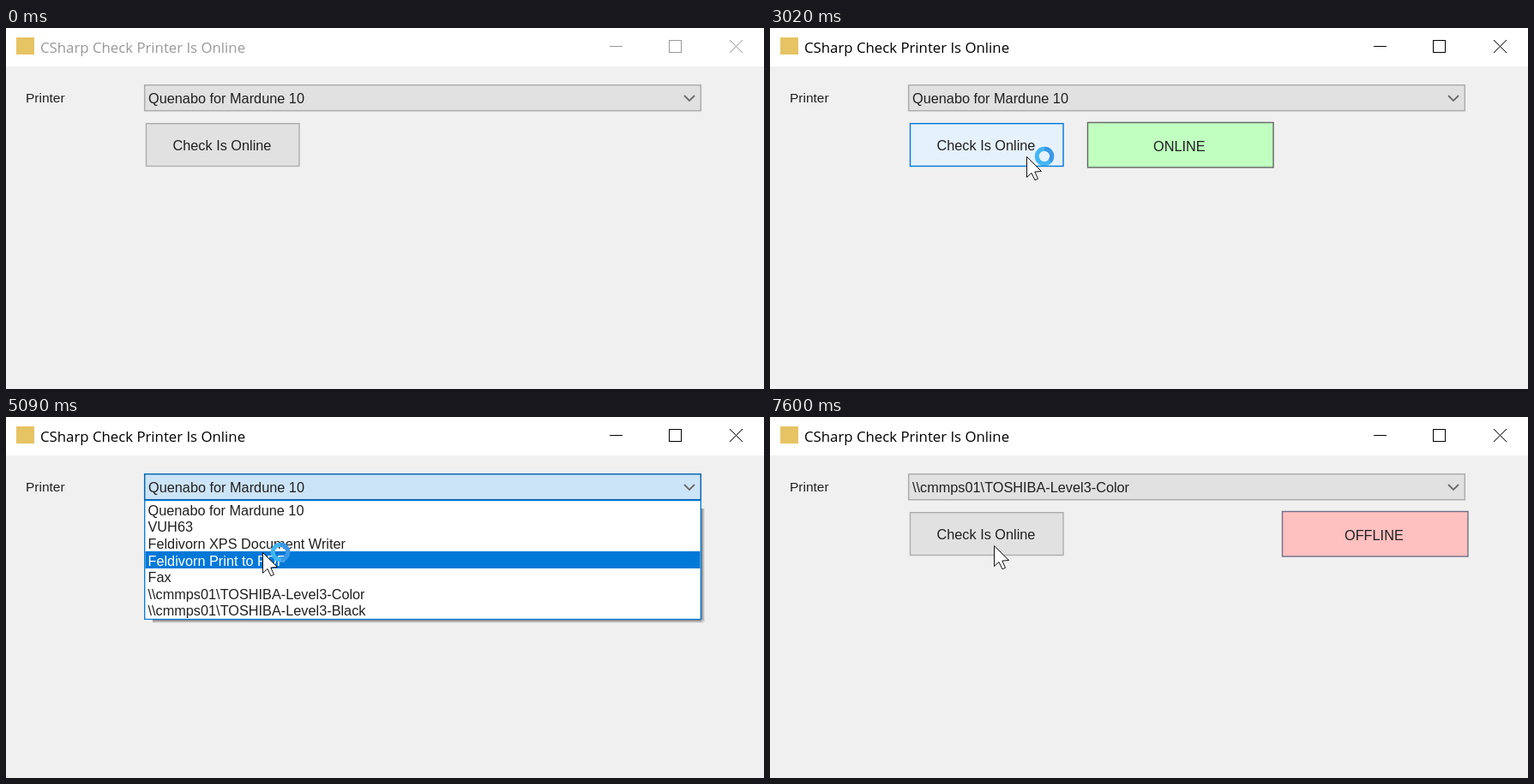
Animation, 884 px wide and 422 px high, one loop 8000 ms. Source, as an HTML page with a canvas:

```html
<!DOCTYPE html>
<html lang="en">
<head>
<meta charset="utf-8">
<title>Printer check</title>
<style>
html, body { margin: 0; width: 100%; height: 100%; overflow: hidden; background: #f0f0f0; }
canvas { display: block; width: 884px; height: 422px; }
</style>
</head>
<body>
<canvas id="stage" width="884" height="422"></canvas>
<script>
const ctx = document.getElementById('stage').getContext('2d');
const LOOP = 8000, FIRST = 330, STEP = 69.2;
const UI = '16.3px "Liberation Sans", Arial, sans-serif';
const LABEL = '15.5px "Liberation Sans", Arial, sans-serif';
const TITLE = '16.8px "Open Sans", "Noto Sans", sans-serif';
const INK = '#202020';

const printers = [
  'Quenabo for Mardune 10',
  'VUH63',
  'Feldivorn XPS Document Writer',
  'Feldivorn Print to PDF',
  'Fax',
  '\\\\cmmps01\\TOSHIBA-Level3-Color',
  '\\\\cmmps01\\TOSHIBA-Level3-Black'
];

// fill, border, text
const looks = {
  normal: ['e1e1e1', 'adadad', '202020'],
  hover: ['e5f1fb', '0078d7', '202020'],
  press: ['cce4f7', '0c67b0', '202020'],
  off: ['cccccc', 'bfbfbf', 'a3a3a3']
};

// start time, look, fade length
const buttonStates = [
  [0, 'normal', 1], [1230, 'hover', 180], [1450, 'press', 90], [1640, 'off', 180],
  [2500, 'hover', 200], [4150, 'normal', 300], [6130, 'hover', 180],
  [6480, 'press', 90], [6640, 'off', 180], [7400, 'normal', 180]
];
const comboStates = [
  [0, 'normal', 1], [4420, 'hover', 220], [4560, 'press', 120], [5990, 'normal', 280]
];

// time, x, y of the pointer tip
const path = [
  [330, 505, 402], [560, 415, 300], [820, 328, 205], [1090, 297, 166], [1230, 299, 150],
  [3800, 299, 150], [4080, 312, 124], [4390, 331, 87], [4480, 331, 85],
  [4660, 331, 85], [4860, 316, 122], [5080, 299, 158], [5220, 299, 158],
  [5450, 282, 200], [5940, 282, 200], [6070, 272, 169], [6240, 262, 152], [6340, 261, 150]
];
const clicks = [1440, 4470, 5640, 6470];
const BUSY_FROM = 1640, BUSY_TO = 7560;
const OPEN = 4511, PICK = 5780;

const lerp = (a, b, u) => a + (b - a) * u;
const clamp = u => Math.max(0, Math.min(1, u));
const between = (t, a, b) => t >= a && t < b;

function mix(a, b, u) {
  const channel = (hex, i) => parseInt(hex.slice(i, i + 2), 16);
  const rgb = [0, 2, 4].map(i => Math.round(lerp(channel(a, i), channel(b, i), u)));
  return `rgb(${rgb})`;
}

function lookAt(states, t) {
  let i = states.length - 1;
  while (i > 0 && states[i][0] > t) i--;
  const [start, name, fade] = states[i];
  const from = looks[states[Math.max(0, i - 1)][1]];
  const u = clamp((t - start) / fade);
  return looks[name].map((c, k) => mix(from[k], c, u));
}

function pointerAt(t) {
  let i = path.length - 1;
  while (i > 0 && path[i][0] > t) i--;
  const a = path[i], b = path[i + 1] || a;
  const u = b === a ? 0 : clamp((t - a[0]) / (b[0] - a[0]));
  return { x: Math.round(lerp(a[1], b[1], u)), y: Math.round(lerp(a[2], b[2], u)) };
}

function rect(x, y, w, h, fill) {
  ctx.fillStyle = fill;
  ctx.fillRect(x, y, w, h);
}

function box(x, y, w, h, fill, border, width = 1.4) {
  rect(x, y, w, h, fill);
  ctx.strokeStyle = border;
  ctx.lineWidth = width;
  ctx.strokeRect(x, y, w, h);
}

function text(s, x, y, color = INK, font = UI) {
  ctx.font = font;
  ctx.fillStyle = color;
  ctx.fillText(s, x, y);
}

function line(points, color, width = 1) {
  ctx.beginPath();
  points.forEach(([x, y]) => ctx.lineTo(x, y));
  ctx.strokeStyle = color;
  ctx.lineWidth = width;
  ctx.stroke();
}

function drawTitleBar(active) {
  rect(0, 0, 884, 45, '#fff');
  rect(12, 11, 21, 20, '#e6c363');
  text('CSharp Check Printer Is Online', 40, 29, active ? '#000' : '#999', TITLE);
  const color = active ? '#000' : '#999';
  line([[704, 21.5], [719, 21.5]], color);
  ctx.strokeRect(773.5, 14.5, 14, 14);
  line([[844, 14], [859, 29]], color);
  line([[859, 14], [844, 29]], color);
}

function drawCombo(t) {
  const [fill, border, ink] = lookAt(comboStates, t);
  box(161.7, 66.7, 648.6, 30, fill, border, 1.5);
  text(printers[t < PICK ? 0 : 5], 166, 88, ink);
  line([[791, 79], [797, 85], [803, 79]], '#6c6c6c', 1.8);
}

function drawButton(t) {
  const [fill, border, ink] = lookAt(buttonStates, t);
  box(163.5, 111.7, 178.5, 49.8, fill, border);
  text('Check Is Online', 194.5, 142.5, ink);
}

function drawResult(s, x, textX, fill, border) {
  box(x + 0.5, 110.5, 216.5, 52.5, fill, border);
  text(s, textX, 144);
}

function drawShadow(bottom) {
  [0.3, 0.42, 0.32, 0.18, 0.07].forEach((alpha, i) => {
    const shade = `rgba(0,0,0,${alpha})`;
    rect(171, bottom - 1 + i, 639 + i, 1, shade);
    rect(810 + i, 107, 1, bottom - 108 + i, shade);
  });
}

function drawList(t, y) {
  const open = clamp((t - OPEN) / 140);
  const height = 140 * open, shift = height - 140;
  const shown = open < 1 ? Math.max(0, height - 28) : 140;
  const pick = Math.max(0, Math.min(6, Math.floor((y - 99) / 19.6)));
  drawShadow(97 + Math.round(height));
  ctx.save();
  ctx.beginPath();
  ctx.rect(161, 97, 650, shown);
  ctx.clip();
  box(161.7, 97.5 + shift, 648.6, 139, '#fff', '#0078d7', 1.3);
  printers.forEach((name, i) => {
    const top = 98.8 + i * 19.6 + shift;
    if (i === pick) rect(162.5, Math.floor(top), 647, 20, '#0078d7');
    text(name, 165.5, top + 16, i === pick ? '#fff' : INK);
  });
  ctx.restore();
}

function drawSpinner(x, y, t) {
  const phase = (((t - 1850) / 682) % 1 + 1) % 1;
  const tail = phase < 0.5 ? Math.pow(clamp((phase - 0.08) / 0.42), 1.4) : 0;
  const head = phase < 0.5 ? 1 : Math.pow(clamp((phase - 0.5) / 0.43), 1.6);
  const ring = (from, to, color) => {
    ctx.beginPath();
    ctx.arc(x, y, 8.7, (from - 0.25) * 2 * Math.PI, (to - 0.25) * 2 * Math.PI);
    ctx.strokeStyle = color;
    ctx.lineWidth = 5;
    ctx.stroke();
  };
  ring(0, 1, '#43b5f3');
  if (head > tail) ring(tail, head, '#3a97e6');
}

function drawPointer({ x, y }) {
  const shape = [[0, 0], [0, 24], [5.5, 19], [9.5, 27.3], [13, 25.8], [9.3, 17.6], [17, 17]];
  ctx.beginPath();
  shape.forEach(([dx, dy]) => ctx.lineTo(x + 0.5 + dx, y + 0.5 + dy));
  ctx.closePath();
  ctx.fillStyle = '#fff';
  ctx.fill();
  ctx.strokeStyle = '#111';
  ctx.lineWidth = 1;
  ctx.stroke();
}

function drawClick({ x, y }) {
  ctx.beginPath();
  ctx.arc(x, y, 19.5, 0, 2 * Math.PI);
  ctx.fillStyle = 'rgba(245,235,50,0.62)';
  ctx.fill();
}

function draw(t) {
  const pointer = pointerAt(t);
  rect(0, 0, 884, 422, '#f0f0f0');
  drawTitleBar(t >= 1440);
  text('Printer', 23, 87, INK, LABEL);
  drawCombo(t);
  drawButton(t);
  if (between(t, 2500, 6640)) drawResult('ONLINE', 370, 447, '#c0ffc0', '#646464');
  if (t >= 7520) drawResult('OFFLINE', 597, 670, '#ffc0c0', '#707086');
  if (between(t, OPEN, PICK)) drawList(t, pointer.y);
  if (t < FIRST) return;
  if (between(t, BUSY_FROM, BUSY_TO)) drawSpinner(pointer.x + 21, pointer.y, t);
  drawPointer(pointer);
  if (clicks.some(c => between(t, c, c + 140))) drawClick(pointer);
}

const began = performance.now();
function tick() {
  const t = (performance.now() - began) % LOOP;
  draw(FIRST + STEP * Math.floor((t - FIRST + 16) / STEP));
  requestAnimationFrame(tick);
}
tick();
</script>
</body>
</html>
```
